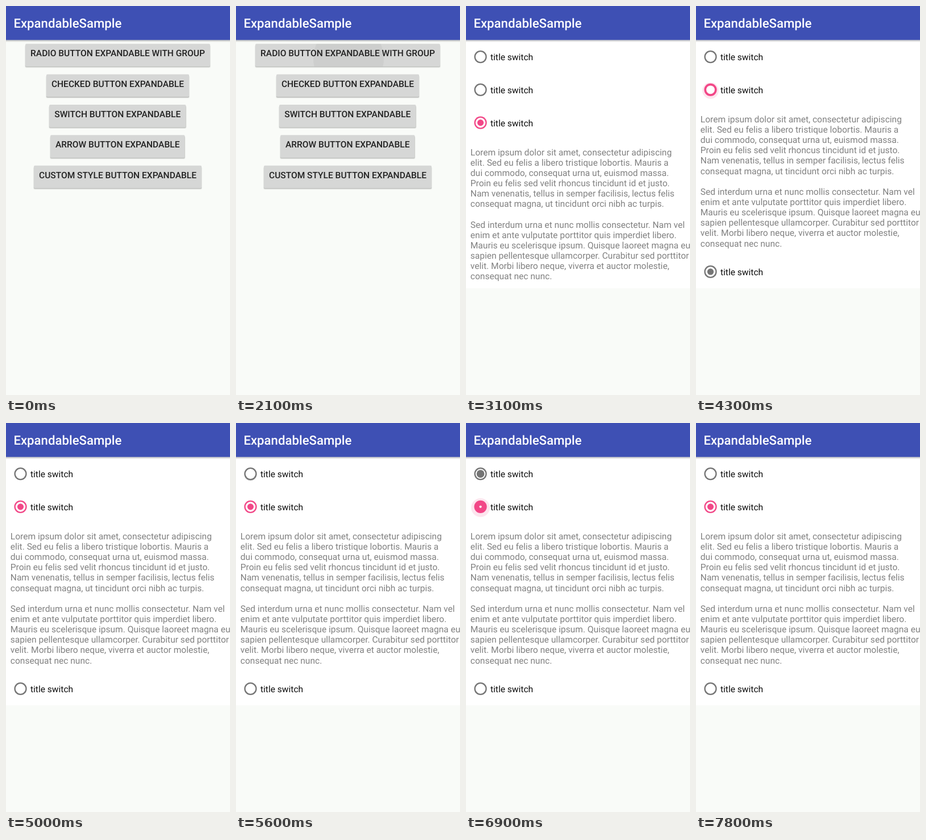
Write an HTML page that moves like this. It is 394 px wide and 682 px high and loops after 8000 ms.

```html
<!DOCTYPE html>
<html lang="en">
<head>
<meta charset="utf-8">
<title>Expandable sample</title>
<style>
html, body { margin: 0; width: 100%; height: 100%; overflow: hidden; background: #f9fbf8; }
svg { display: block; width: 394px; height: 682px; font-family: Roboto, sans-serif; font-size: 15.55px; text-rendering: geometricPrecision; }
.bar { font-size: 22.2px; font-weight: 500; fill: #fff; }
.btn { font-weight: 500; fill: #222; text-anchor: middle; }
.body { fill: #808080; }
.label { fill: #0c0c0c; }
</style>
</head>
<body>
<svg id="stage" viewBox="0 0 394 682">
  <defs>
    <linearGradient id="shade" x2="0" y2="1">
      <stop stop-color="#000" stop-opacity=".24"/>
      <stop offset="1" stop-color="#000" stop-opacity="0"/>
    </linearGradient>
    <clipPath id="firstBtn"><rect x="34" y="66.3" width="325" height="39.7" rx="2"/></clipPath>
  </defs>
  <rect width="394" height="682" fill="#f9fbf8"/>
  <g id="menu"></g>
  <g id="page"><rect y="59" width="394" height="436" fill="#fff"/></g>
  <rect width="394" height="59.6" fill="#3e50b4"/>
  <rect y="59.6" width="394" height="4" fill="url(#shade)"/>
  <text class="bar" x="13.4" y="37.6">ExpandableSample</text>
</svg>
<script>
const LOOP = 8000, OPEN = 2130, OPEN_MS = 150;
const ROW_Y = 89.1, ROW_H = 57.75, TEXT_H = 261.3, LINE_H = 18.15;
const CX = 25.5, OUTER = 11.1, INNER = 8.8, DOT = 5.6;
const PINK = '#f24787', GREY = '#757575';
const TAP_DELAY = 175, FIRST_OPEN = 2;
const taps = [{ at: 4100, row: 1 }, { at: 5500, row: 0 }, { at: 6600, row: 1 }];
const buttons = [
  ['RADIO BUTTON EXPANDABLE WITH GROUP', 34, 359],
  ['CHECKED BUTTON EXPANDABLE', 71, 322],
  ['SWITCH BUTTON EXPANDABLE', 76, 316.5],
  ['ARROW BUTTON EXPANDABLE', 78, 314.5],
  ['CUSTOM STYLE BUTTON EXPANDABLE', 49, 344]
];
const lines = [
  'Lorem ipsum dolor sit amet, consectetur adipiscing',
  'elit. Sed eu felis a libero tristique lobortis. Mauris a',
  'dui commodo, consequat urna ut, euismod massa.',
  'Proin eu felis sed velit rhoncus tincidunt id et justo.',
  'Nam venenatis, tellus in semper facilisis, lectus felis',
  'consequat magna, ut tincidunt orci nibh ac turpis.',
  '',
  'Sed interdum urna et nunc mollis consectetur. Nam vel',
  'enim et ante vulputate porttitor quis imperdiet libero.',
  'Mauris eu scelerisque ipsum. Quisque laoreet magna eu',
  'sapien pellentesque ullamcorper. Curabitur sed porttitor',
  'velit. Morbi libero neque, viverra et auctor molestie,',
  'consequat nec nunc.'
];

const $ = id => document.getElementById(id);
const clamp = v => Math.max(0, Math.min(1, v));
const mix = (a, b, p) => a + (b - a) * p;
const easeOut = p => 1 - (1 - p) ** 2;

function set(el, attrs) {
  for (const k in attrs) el.setAttribute(k, attrs[k]);
  return el;
}
function add(parent, tag, attrs, text) {
  const el = set(document.createElementNS('http://www.w3.org/2000/svg', tag), attrs);
  if (text) el.textContent = text;
  return parent.appendChild(el);
}

const menu = $('menu'), page = $('page');
buttons.forEach(([label, x, right], i) => {
  const y = 66.3 + i * 53.35, width = right - x;
  [[-.8, 2.4, .06], [-.3, 1.6, .1], [0, .8, .12]].forEach(([grow, dy, alpha]) =>
    add(menu, 'rect', { x: x + grow, y: y + dy, width: width - 2 * grow, height: 39.7, rx: 2.5, opacity: alpha }));
  add(menu, 'rect', { x, y, width, height: 39.7, rx: 2, fill: '#d6d7d6' });
  if (!i) {
    const clipped = add(menu, 'g', { 'clip-path': 'url(#firstBtn)' });
    menu.press = add(clipped, 'circle', { cx: 198, cy: 92, opacity: .045 });
  }
  add(menu, 'text', { class: 'btn', x: (x + right) / 2, y: y + 22 }, label);
});

const ripple = add(page, 'circle', { cx: CX });
const rows = [0, 1, 2].map(() => {
  const g = add(page, 'g', {});
  const ring = add(g, 'circle', { cx: CX, r: OUTER });
  const hole = add(g, 'circle', { cx: CX, fill: '#fff' });
  const dot = add(g, 'circle', { cx: CX });
  add(g, 'text', { class: 'label', x: 43, y: 5.9 }, 'title switch');
  return { g, ring, hole, dot };
});
const copy = add(page, 'g', { class: 'body' });
lines.forEach((s, i) => add(copy, 'text', { x: 7.8, y: i * LINE_H }, s));

// Ring fills up, then opens again around the dot (on) or empty (off).
function radioShape(on, ms) {
  if (on) {
    if (ms < 166) return [INNER * (1 - ms / 166), 0];
    const p = easeOut(clamp((ms - 166) / 330));
    return [mix(7, INNER, p), mix(7, DOT, p)];
  }
  if (ms < 200) return [INNER, mix(DOT, INNER, (ms / 200) ** 2)];
  return [INNER * clamp((ms - 200) / 480), 0];
}

function draw(t) {
  const shown = clamp((t - OPEN) / OPEN_MS);
  page.setAttribute('opacity', shown);
  menu.setAttribute('opacity', shown < 1 ? 1 - shown * shown : 0);
  menu.press.setAttribute('r', 62 * clamp((t - 1560) / 520));

  let open = FIRST_OPEN, prev = -1, since = 1e4;
  for (const { at, row } of taps) {
    if (t < at + TAP_DELAY) break;
    prev = open;
    open = row;
    since = t - at - TAP_DELAY;
  }
  const rowY = i => ROW_Y + i * ROW_H + (i > open ? TEXT_H : 0);

  rows.forEach(({ g, ring, hole, dot }, i) => {
    const on = i === open, color = on ? PINK : GREY;
    const [holeR, dotR] = radioShape(on, on || i === prev ? since : 1e4);
    g.setAttribute('transform', `translate(0 ${rowY(i)})`);
    set(ring, { fill: color });
    set(hole, { r: holeR });
    set(dot, { r: dotR, fill: color });
  });
  copy.setAttribute('transform', `translate(0 ${ROW_Y + open * ROW_H + 57})`);

  const tap = taps.find(({ at }) => t >= at - 30 && t < at + 850);
  if (tap) {
    const ms = t - tap.at + 30;
    set(ripple, {
      cy: rowY(tap.row) + 1.5,
      r: mix(4, 17, easeOut(clamp(ms / 420))),
      fill: ms < TAP_DELAY + 30 ? '#000' : PINK,
      opacity: .14 * (1 - clamp((ms - 380) / 470))
    });
  } else ripple.setAttribute('opacity', 0);
}

const start = performance.now();
function tick() {
  draw((performance.now() - start) % LOOP);
  requestAnimationFrame(tick);
}
tick();
</script>
</body>
</html>
```
